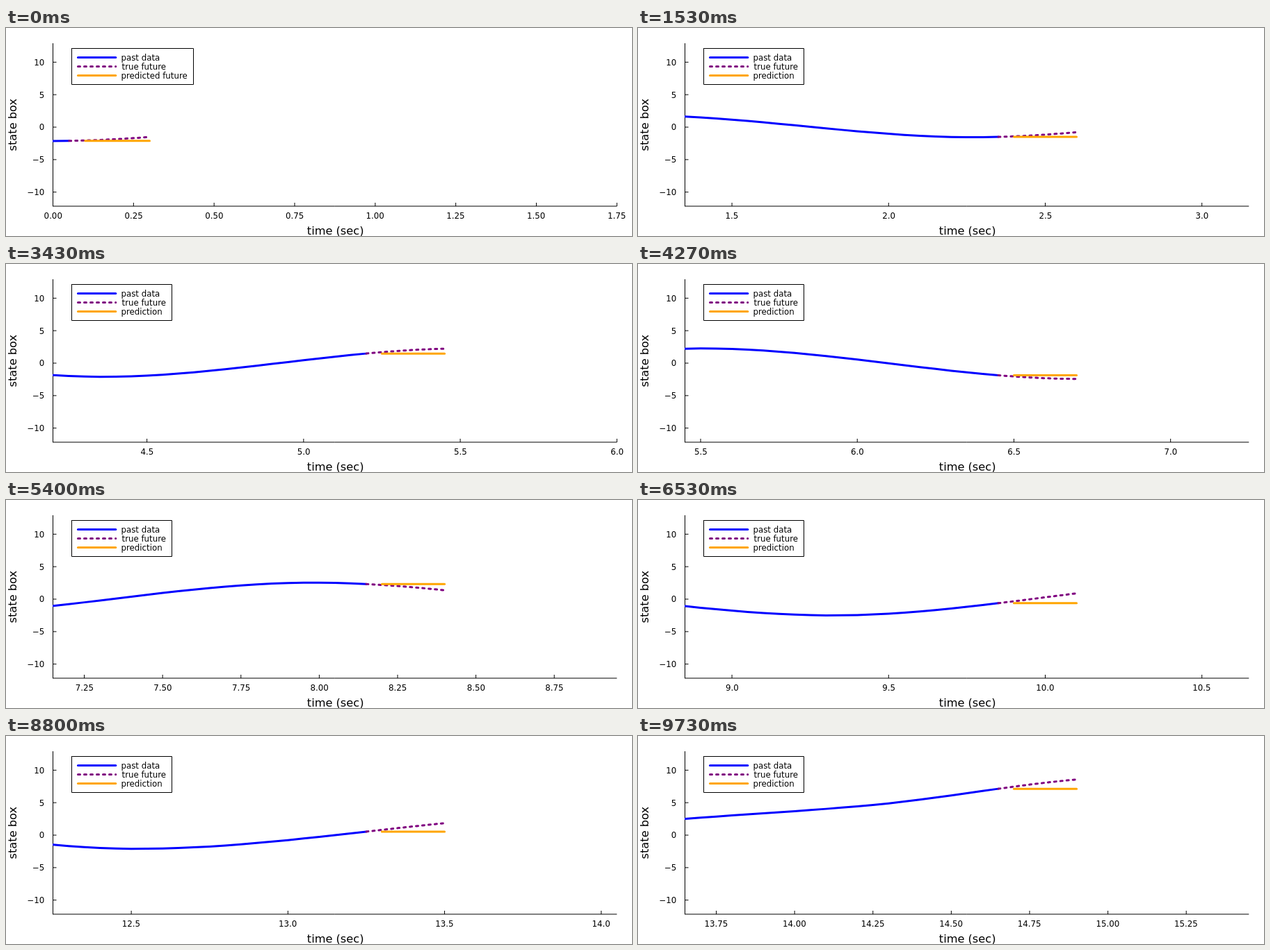
Animation, 900 px wide and 300 px high, one loop 9760 ms. Source, as an HTML page with a canvas:

```html
<!DOCTYPE html>
<html>
<head>
<meta charset="utf-8">
<style>
html, body { margin: 0; width: 900px; height: 300px; overflow: hidden; background: #fff; }
canvas { display: block; }
</style>
</head>
<body>
<canvas id="stage" width="900" height="300"></canvas>
<script>
const ctx = document.getElementById('stage').getContext('2d');
const LOOP = 9760, LAST_STEP = 292, DT = 0.05;
const LEFT = 67.5, RIGHT = 878.3, TOP = 22, BOTTOM = 257;
const BLUE = '#0000ff', PURPLE = '#800080', ORANGE = '#ffa500';

// Turning points of the oscillation, then its final climb
const keys = [
  [0, -2.13], [1.2, 1.8], [2.27, -1.56], [3.35, 1.93], [4.36, -2.1], [5.51, 2.26],
  [6.71, -2.43], [7.98, 2.55], [9.32, -2.5], [10.65, 3.05], [10.95, 3.13], [11.3, 3.05],
  [12.52, -2.1], [13.65, 2.5], [14.25, 4.65], [14.9, 8.57], [15.3, 9.9]
];

const secant = i => (keys[i + 1][1] - keys[i][1]) / (keys[i + 1][0] - keys[i][0]);

// Flat at turning points and ends, harmonic mean of the neighbours elsewhere
function slopeAt(i) {
  if (i === 0 || i === keys.length - 1) return 0;
  const a = secant(i - 1), b = secant(i);
  return a * b <= 0 ? 0 : 2 * a * b / (a + b);
}

function signal(t) {
  const i = keys.findIndex((key, k) => k > 0 && t <= key[0]) - 1;
  const [t0, y0] = keys[i], [t1, y1] = keys[i + 1];
  const h = t1 - t0, u = (t - t0) / h, v = 1 - u;
  return y0 + (y1 - y0) * u * u * (3 - 2 * u) +
    h * u * v * (v * slopeAt(i) - u * slopeAt(i + 1));
}

const yPos = v => 143 - v * 9.37;

function stroke(points, color, width, dash = []) {
  ctx.beginPath();
  points.forEach(([x, y]) => ctx.lineTo(x, y));
  ctx.strokeStyle = color;
  ctx.lineWidth = width;
  ctx.lineCap = width > 1 ? 'round' : 'butt';
  ctx.lineJoin = 'round';
  ctx.setLineDash(dash);
  ctx.stroke();
}

const thin = (...points) => stroke(points, '#000', 1);
const thick = (points, color) => stroke(points, color, 3, color === PURPLE ? [3, 6] : []);

// Aligns the visible ink: 0 is left, 0.5 centre, 1 right
function label(text, x, y, align = 0.5, size = 11.8) {
  ctx.font = size + 'px "DejaVu Sans", sans-serif';
  ctx.fillStyle = '#000';
  const ink = ctx.measureText(text);
  const { actualBoundingBoxLeft: before, actualBoundingBoxRight: after } = ink;
  ctx.fillText(text, x + before * (1 - align) - after * align, y);
}

function drawAxes(first, last, xPos) {
  thin([LEFT, TOP], [LEFT, BOTTOM]);
  thin([LEFT - 0.5, BOTTOM], [RIGHT, BOTTOM]);
  for (let v = -10; v <= 10; v += 5) {
    const y = yPos(v);
    thin([LEFT, y], [LEFT + 5, y]);
    label(String(v).replace('-', '\u2212'), 54.8, y + 4.4, 1);
  }

  // Half-second ticks unless fewer than four of them fit
  const count = s => Math.floor(last / s + 1e-6) - Math.ceil(first / s - 1e-6) + 1;
  const fine = last < 1.76 || count(0.5) < 4;
  const step = fine ? 0.25 : 0.5;
  const start = Math.ceil(first / step - 1e-6);
  for (let i = 0; i < count(step); i++) {
    const t = (start + i) * step, x = xPos(t);
    thin([x, BOTTOM], [x, BOTTOM - 5]);
    label(t.toFixed(fine ? 2 : 1), x, 275.3);
  }

  label('time (sec)', 473, 297.6, 0.5, 16.2);
  ctx.save();
  ctx.translate(14.5, 139.5);
  ctx.rotate(-Math.PI / 2);
  label('state box', 0, 0, 0.5, 16.2);
  ctx.restore();
}

function drawLegend(early) {
  const right = early ? 269.5 : 238.5;
  ctx.fillStyle = '#fff';
  ctx.fillRect(94.5, 29.5, right - 94.5, 52);
  thin([94.5, 29.5], [right, 29.5], [right, 81.5], [94.5, 81.5], [94.5, 29]);
  const entries = [['past data', BLUE], ['true future', PURPLE],
    [early ? 'predicted future' : 'prediction', ORANGE]];
  entries.forEach(([text, color], i) => {
    const y = 42.5 + 13 * i;
    thick([[103.5, y], [157.8, y]], color);
    label(text, 166.5, y + 4.5, 0);
  });
}

function draw(step) {
  const now = step + 1;
  const early = now < 20;
  const first = Math.max(0, now - 20) * DT;
  const last = Math.max(35, now + 16) * DT;
  const xPos = t => LEFT + (t - first) / (last - first) * (RIGHT - LEFT);
  const trace = (from, to, value) => {
    const points = [];
    for (let i = from; i <= to; i++) points.push([xPos(i * DT), yPos(value(i * DT))]);
    return points;
  };

  ctx.fillStyle = '#fff';
  ctx.fillRect(0, 0, 900, 300);
  drawAxes(first, last, xPos);

  ctx.save();
  ctx.beginPath();
  ctx.rect(LEFT - 0.5, TOP, RIGHT - LEFT + 1, BOTTOM - TOP);
  ctx.clip();
  thick(trace(Math.max(0, now - 20), now, signal), BLUE);
  thick(trace(now, now + 5, signal), PURPLE);
  const held = signal(now * DT);
  thick(trace(now + 1, now + 5, () => held), ORANGE);
  ctx.restore();

  drawLegend(early);
}

// Thirty steps a second, each starting on a whole hundredth
function tick() {
  const hundredths = Math.floor((performance.now() % LOOP) / 10);
  draw(Math.min(LAST_STEP, Math.floor((hundredths + 0.34) * 0.3)));
  requestAnimationFrame(tick);
}
tick();
</script>
</body>
</html>
```
